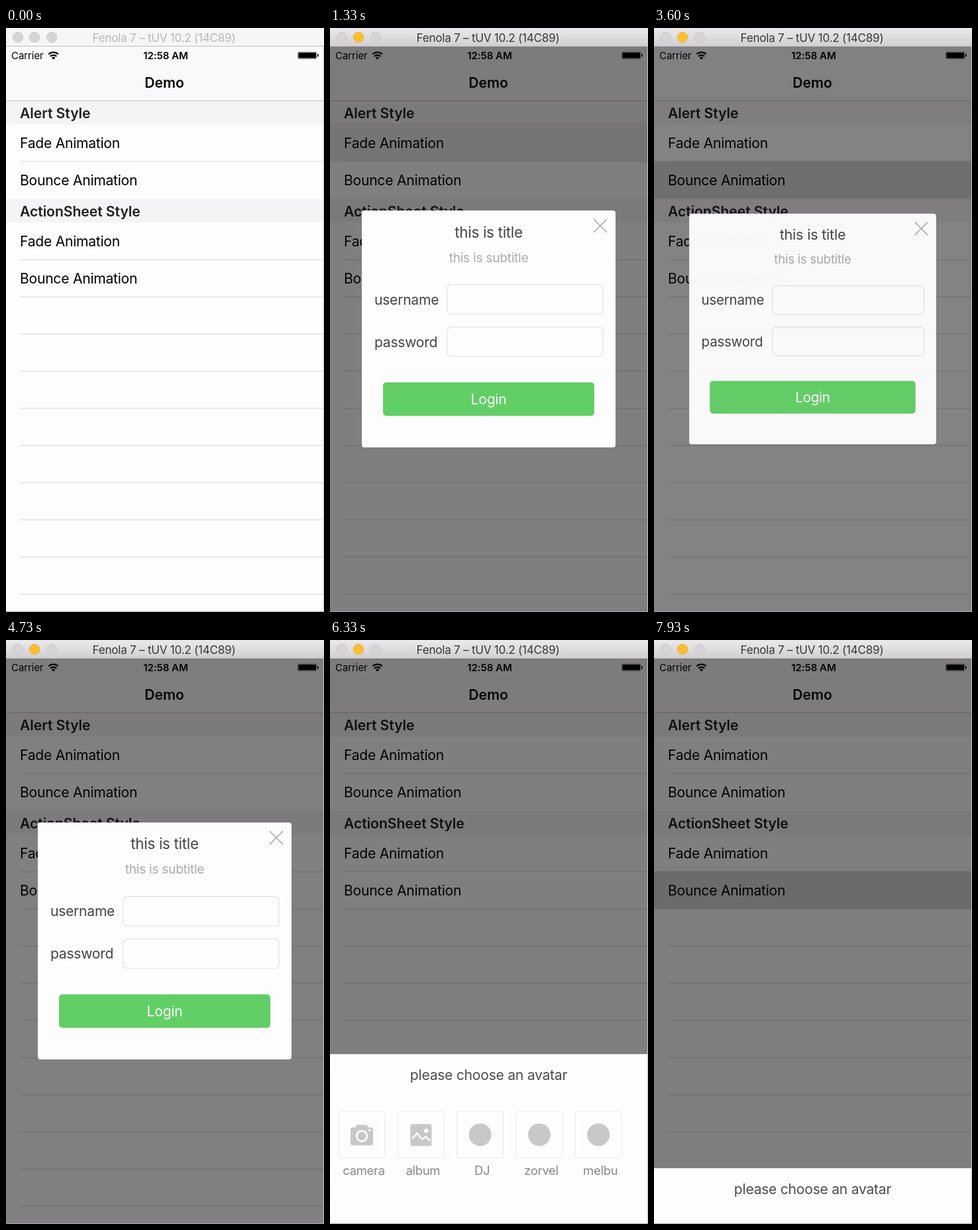
An HTML page for the animation above (8000 ms loop, 480 by 880 pixels).

```html
<!DOCTYPE html>
<html lang="en">
<head>
<meta charset="utf-8">
<style>
  html, body { margin: 0; width: 480px; height: 880px; overflow: hidden; background: #fefdfe; }
  svg { display: block; font: 21.1px Inter, "Open Sans", sans-serif; letter-spacing: -.012em; }
  .bold { font-weight: 600; letter-spacing: -.002em; }
  .mid { text-anchor: middle; }
  .line { fill: none; stroke: #dfe1e8; stroke-width: 1.2; }
</style>
</head>
<body>
<svg id="stage" width="480" height="880"></svg>
<script>
const stage = document.getElementById('stage');

const text = (x, y, str, attrs = '') => `<text x="${x}" y="${y}" ${attrs}>${str}</text>`;
const rect = (x, y, w, h, fill, attrs = '') =>
  `<rect x="${x}" y="${y}" width="${w}" height="${h}" fill="${fill}" ${attrs}/>`;
const circle = (x, y, r, attrs) => `<circle cx="${x}" cy="${y}" r="${r}" ${attrs}/>`;
const section = (y, title) => rect(0, y, 480, 35.5, '#f4f3f5') + text(21, y + 26, title, 'class="bold" fill="#1f1e20"');

const separators = [201, 349, 405, 461, 517, 573, 629, 685, 741, 797, 853]
  .map(y => rect(21, y - .5, 459, 1.3, '#dedde0')).join('');
const rows = [[180.5, 'Fade'], [236.5, 'Bounce'], [328.5, 'Fade'], [384.5, 'Bounce']]
  .map(([y, name]) => text(21, y, name + ' Animation')).join('');

const statusBar = text(8, 46.5, 'Carrier', 'font-size="14.9" letter-spacing="0"') +
  `<g fill="none" stroke="#000" stroke-width="2.1">
    <path d="M64.3 39.6a10.4 10.4 0 0 1 14.6 0"/><path d="M66.9 42.8a6.6 6.6 0 0 1 9.4 0"/>
  </g><path d="M71.6 47.6l-2.7-2.7a3.9 3.9 0 0 1 5.4 0z"/>` +
  text(241, 46.5, '12:58 AM', 'class="bold mid" font-size="15"') +
  rect(440.5, 36, 28.5, 10.5, 'none', 'rx="2" stroke="#000" stroke-width=".8" stroke-opacity=".5"') +
  rect(441.4, 36.9, 26.7, 8.7, '#000', 'rx="1"') + rect(470, 39, 1.6, 4.5, '#000', 'rx=".8"');

const titleBar = rect(0, 0, 480, 28, '#f6f5f6', 'id="bar"') + rect(0, 27, 480, 1, '#c0bec0') +
  [18, 43, 69].map(x => circle(x, 14, 7.7, `class="light" fill="#d6d4d6" stroke="#c6c4c6" stroke-width=".8"`)).join('') +
  text(238.5, 20.5, 'Fenola 7 – tUV 10.2 (14C89)', 'id="caption" class="mid" font-size="17.1"');

const field = (y, label) => text(67, y + 30, label, 'fill="#444"') +
  rect(177, y, 235, 44.5, '#fefdfe', 'rx="6" class="line"');
const alertBox = rect(48, 275, 383, 357, '#fefdfe', 'rx="4"') +
  text(239.5, 315.5, 'this is title', 'class="mid" fill="#444" font-size="22.3"') +
  text(239.5, 352.5, 'this is subtitle', 'class="mid" fill="#aaa" font-size="19.1"') +
  '<path d="M398 288l20 20m0-20l-20 20" stroke="#a5a5a5" stroke-width="1.5"/>' +
  field(386.5, 'username') + field(450.5, 'password') +
  rect(80, 534, 319, 50.5, '#62cf66', 'rx="5"') + text(239.5, 567, 'Login', 'class="mid" fill="#fff"');

const dot = circle(0, 0, 17, '');
const icons = {
  camera: `<path d="M-14-11h4l3-4h14l3 4h4a3 3 0 0 1 3 3v21a3 3 0 0 1-3 3h-28a3 3 0 0 1-3-3v-21a3 3 0 0 1 3-3z"/>` +
    circle(0, 2, 7.8, 'fill="none" stroke="#fff" stroke-width="2.8"') + rect(10, -8, 4, 2.5, '#fff'),
  album: `<rect x="-16" y="-16" width="32" height="33" rx="3"/>` + circle(8, -6, 3.2, 'fill="#fff"') +
    '<path d="M-13 6l7-8 8 9 5-4 7 6" fill="none" stroke="#fff" stroke-width="2.6"/>',
  DJ: dot, zorvel: dot, melbu: dot
};
const choices = Object.entries(icons).map(([name, icon], i) =>
  `<g transform="translate(${48 + i * 89.3} 745.5)" fill="#c8c8c8">` +
  rect(-35, -35, 70, 70, 'none', 'rx="4" class="line" style="stroke:#e9ebf0"') + icon +
  text(3, 60, name, 'class="mid" fill="#888" font-size="18.4"') + '</g>').join('');
const sheetBox = rect(0, 624, 480, 400, '#fefdfe') +
  text(239.5, 663, 'please choose an avatar', 'class="mid" fill="#4c4c4c"') + choices;

stage.innerHTML = `<defs><linearGradient id="active" x2="0" y2="1">
    <stop stop-color="#ebe9eb"/><stop offset="1" stop-color="#d0ced0"/></linearGradient></defs>` +
  rect(0, 0, 480, 880, '#fefdfe') + rect(0, 28, 480, 82, '#f9f8fa') + rect(0, 109, 480, 1.2, '#c3c2c5') +
  statusBar + text(239, 89.5, 'Demo', 'class="bold mid"') +
  separators + section(110, 'Alert Style') + section(257.5, 'ActionSheet Style') +
  rect(0, 0, 480, 57, '#d6d5d7', 'id="press"') + rows +
  rect(0, 28, 480, 852, '#030004', 'id="dim"') +
  `<g id="alert">${alertBox}</g><g id="sheet">${sheetBox}</g>` + titleBar +
  rect(479, 28, 1, 852, '#c9c7c9') + rect(0, 879, 480, 1, '#a9a7a9');

const [bar, caption, press, dim, alertView, sheet] =
  ['bar', 'caption', 'press', 'dim', 'alert', 'sheet'].map(id => document.getElementById(id));
const yellowLight = stage.querySelectorAll('.light')[1];
const set = (el, attrs) => { for (const key in attrs) el.setAttribute(key, attrs[key]); };

const ramp = (t, from, to) => {
  const x = Math.min(1, Math.max(0, (t - from) / (to - from)));
  return x * x * (3 - 2 * x);
};
const spring = ms => {
  if (ms <= 0) return 0;
  const s = ms / 1000, k = 10, w = 15.6;
  return 1 - Math.exp(-k * s) * (Math.cos(w * s) + k / w * Math.sin(w * s));
};

// tap time, row top, start of the deselect fade
const taps = [[1070, 145, 1200], [3470, 201, 3600], [5670, 293, 5800], [7530, 349, 8000]];

function draw(t) {
  const active = t >= 1070;
  set(bar, { fill: active ? 'url(#active)' : '#f6f5f6' });
  set(caption, { fill: active ? '#3a383a' : '#b9b7b9' });
  set(yellowLight, { fill: active ? '#fdbe32' : '#d6d4d6', stroke: active ? '#e6a935' : '#c6c4c6' });

  const [, top, release] = taps.findLast(([tap]) => t >= tap) || [0, 0, -999];
  set(press, { y: top - .5, opacity: 1 - ramp(t, release, release + 260) });

  const fade = ramp(t, 1130, 1320) - ramp(t, 2400, 2750);
  const bounce = t < 4945 ? spring(t - 3470) : 1 - ramp(t, 4945, 5295);
  const scale = t < 3470 ? 1 : .14 + .86 * bounce;
  const alertAlpha = Math.min(1, fade + bounce);
  set(alertView, {
    opacity: alertAlpha,
    transform: `translate(239.5 453.5) scale(${scale}) translate(-239.5 -453.5)`
  });

  const leave = ramp(t, 6950, 7250);
  const rise = ramp(t, 5800, 6130) - leave + spring(t - 7877.5);
  set(sheet, { transform: `translate(0 ${256 * (1 - rise)})` });
  set(dim, { opacity: .5 * (alertAlpha + ramp(t, 5740, 6000) - leave + ramp(t, 7600, 7880)) });
}

(function tick() {
  draw(performance.now() % 8000);
  requestAnimationFrame(tick);
})();
</script>
</body>
</html>
```
